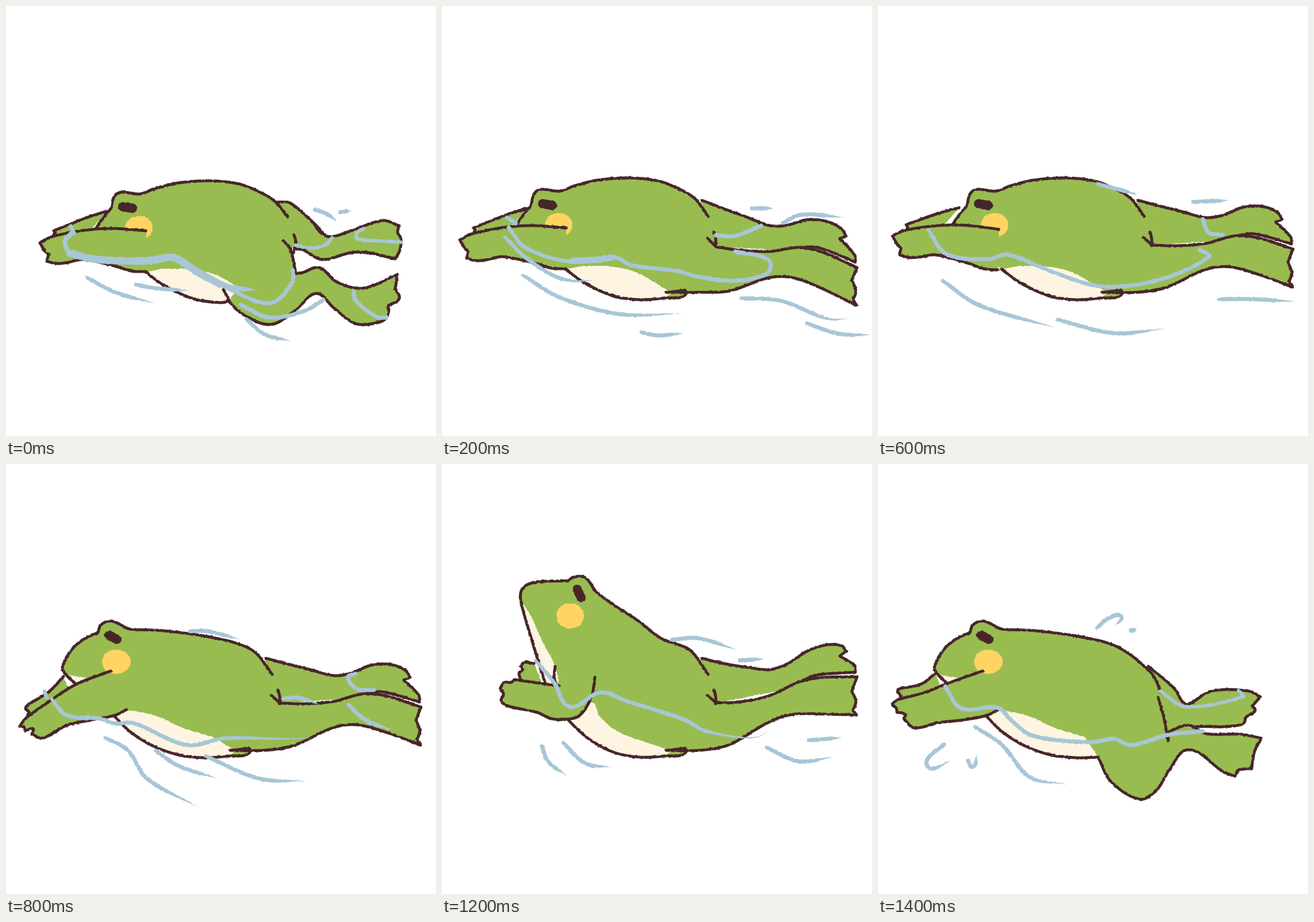
An HTML page for the animation above (1600 ms loop, 748 by 748 pixels).

```html
<!DOCTYPE html>
<html lang="en">
<head>
<meta charset="utf-8">
<title>Swimming frog</title>
<style>
html, body { margin: 0; width: 100%; height: 100%; overflow: hidden; background: #fff; }
svg { display: block; width: 100vw; height: 100vh; }
.pose {
  visibility: hidden;
  animation: show 1600ms step-end infinite;
  animation-delay: calc(var(--i) * 200ms - 1600ms);
}
@keyframes show {
  0% { visibility: visible; }
  12.5%, 100% { visibility: hidden; }
}
</style>
</head>
<body>
<svg id="stage" viewBox="0 0 748 748" xmlns="http://www.w3.org/2000/svg">
  <filter id="rough" filterUnits="userSpaceOnUse" x="0" y="0" width="748" height="748" color-interpolation-filters="sRGB">
    <feTurbulence type="fractalNoise" baseFrequency=".2" numOctaves="2" seed="4"/>
    <feDisplacementMap in="SourceGraphic" scale="3" xChannelSelector="R" yChannelSelector="G"/>
  </filter>
</svg>
<script>
const GREEN = '#99bc50', INK = '#47262a', CREAM = '#fef4e2', GOLD = '#ffd462', BLUE = '#a8c6d7';
const stage = document.getElementById('stage');

// Outlines are strings of "x,y" points; a slash makes the point before it a corner.
const readPoints = text => text.trim().split(/\s+/).map(pair => pair.split(',').map(Number));
const warp = (text, rule) => text.replace(/([\d.]+),([\d.]+)/g, (_, x, y) => rule(+x, +y).map(v => +v.toFixed(1)));

const move = (text, dx, dy) => warp(text, (x, y) => [x + dx, y + dy]);
// Arms turn about the chin.
const tilt = (text, slope) => warp(text, (x, y) => [x, y + (x - 150) * slope]);
// Arms sink towards the hand.
const droop = (text, drop) => warp(text, (x, y) => [x, y + drop * (Math.max(0, 150 - x) / 126) ** 2]);
// Legs swing straight, or curl more towards the feet.
const bend = (text, swing, curl) => warp(text, (x, y) => {
  const u = Math.max(0, x - 452) / 270;
  return [x, y + swing * u + curl * u * u];
});
function mix(from, to, t) {
  const ends = to.match(/[\d.]+,[\d.]+/g).map(pair => pair.split(',').map(Number));
  let i = 0;
  return warp(from, (x, y) => {
    const [ex, ey] = ends[i++];
    return [x + (ex - x) * t, y + (ey - y) * t];
  });
}

const low = {
  backArm: '147,352 110,364 55,386 / 58,391 / 50,402 120,385',
  arm: '216,386 160,382 128,383 90,388 50,397 31,407 / 40,422 46,427 / 43,439 / 60,443 80,441 105,436 160,447 190,456 215,457',
  head: '128,383 / 140,365 155,347 / 160,327 172,319 205,322 230,313 270,303 325,299 375,304 410,317 440,335',
  cheek: '203,381 24,21', eye: '175,344 192,347',
  belly: '345,511 300,505 250,483 215,458',
  top: '250,452 300,454 340,464 375,484'
};
const mid = {
  backArm: '100,364 75,383 40,390 / 34,394 40,404 / 38,410 110,390',
  arm: '182,360 120,382 80,398 35,410 24,418 / 32,425 33,432 / 47,435 45,443 / 63,459 105,450 150,445 190,437 210,427',
  head: '121,383 / 100,361 99,350 115,322 135,305 160,293 / 165,280 182,273 200,280 215,287 260,289 310,294 360,302 405,313 435,329',
  chest: '100,361 107,366 120,369 130,371 140,373 121,383 110,372',
  cheek: '192,344 25,21', eye: '179,298 193,305',
  belly: '345,511 300,506 255,490 215,465 187,437',
  top: '212,429 260,438 310,460 360,475'
};
const high = {
  backArm: '160,347 143,345 137,352 / 140,358 134,364 138,377 / 175,384',
  arm: '204,386 160,380 126,375 / 120,380 108,380 101,391 / 107,400 103,412 115,421 165,432 190,443 218,444 240,437 260,405 266,371',
  head: '180,383 / 155,302 137,237 140,217 160,206 220,203 / 228,197 245,196 255,203 268,222 300,246 340,272 382,304 405,312 433,325',
  chest: '138,238 155,265 175,310 195,348 200,385 180,383 155,302',
  cheek: '223,264 24,22', eye: '235,218 242,232',
  belly: '345,510 300,502 255,478 218,444',
  top: '245,435 261,415 275,440 305,465 345,481'
};
// Halfway up, with the arms carried along.
const rising = {
  ...mid,
  backArm: move(mid.backArm, 38, -3), arm: move(mid.arm, 38, -3),
  belly: '345,511 300,506 255,490 225,468 205,440', top: '245,432 275,440 320,463 360,477'
};
for (const key of ['head', 'chest', 'cheek', 'eye']) rising[key] = mix(mid[key], high[key], .62);

function reach(slope, dx) {
  const shape = { ...low };
  for (const key of ['arm', 'backArm']) shape[key] = move(tilt(low[key], slope), dx, -1);
  return shape;
}
const dipped = { ...mid, arm: droop(mid.arm, 38), backArm: droop(mid.backArm, 36) };
const ahead = {};
for (const key in low) ahead[key] = key === 'cheek' ? '231,386 24,21' : move(low[key], 28, 5);

const straight = (swing = 0, curl = 0) => ({
  far: bend('452,338 490,348 530,358 570,368 600,364 635,350 670,349 695,359 703,371 / 692,376 / 718,402 719,414 / 690,405 650,396 615,402', swing, curl),
  join: bend('/ 600,408 / 478,416 / 440,390', swing, curl),
  near: bend('462,403 477,416 / 520,417 570,413 620,400 660,403 722,423 / 713,445 / 720,465 715,479 / 721,489 / 665,468 620,455 590,454 560,462 500,490 450,498 390,498', swing, curl),
  thigh: '425,500 385,508', back: '463,366', lines: ['k 473,393 476,404 476,417']
});
const kicking = {
  far: '473,341 495,343 540,382 560,401 600,391 655,373 683,382 / 681,394 / 687,405 685,425 677,440 / 630,429 600,429 550,441 518,425 504,422',
  join: '/ 470,420',
  near: '482,408 495,424 504,465 / 515,464 545,455 575,480 620,491 681,467 / 677,492 / 684,509 665,521 / 665,535 655,548 610,553 570,525 540,500 505,528 460,554 410,535 388,514',
  thigh: '388,514', back: '490,367',
  lines: ['k 378,493 390,516', 'k 501,398 504,410 500,430', 'k 536,380 546,393 560,401']
};
const tucked = {
  far: '470,352 515,390 530,414 540,418 580,395 645,395 665,405 / 651,421 / 656,429 640,440 / 635,452 600,457 555,457 505,467',
  join: '/ 480,440',
  near: '487,406 497,440 505,482 / 505,466 / 540,454 570,469 630,470 667,477 / 655,500 650,530 / 628,532 621,543 / 600,535 540,497 505,535 485,567 455,583 405,552 383,510',
  thigh: '383,510', back: '460,349 480,370 492,397', lines: []
};

// Water: w is an even line, t thins out at its end; a number sets the width.
const poses = [
  [ahead, kicking, [
    'w8 113,396 103,408 107,425 114,433', 'w13 112,430 150,440 200,443 250,443 292,438 330,461 372,484',
    't9 365,480 395,490 436,494', 'w 372,484 440,515 470,513 498,480 499,460', 'w 408,520 460,542 520,530 552,511',
    't 416,543 450,571 497,583', 't 138,471 190,498 258,517', 't 223,484 260,491 320,495',
    't 534,354 555,360 576,374', 't 578,359 600,356',
    'w6 503,416 530,421 555,416 567,403', 'w6 622,387 610,395 612,405 640,408 687,411',
    'w 605,496 608,512 645,541 662,542', 'w 113,384 118,395'
  ]],
  [low, straight(32), [
    'w 116,385 145,420 225,445 300,437 330,451 410,461 440,470 500,478 545,473 570,460 566,440 510,427',
    'w11 228,443 260,442 295,438', 't 108,400 140,433 190,467 225,478 265,477',
    't 139,467 205,507 310,536 418,535', 't 344,567 375,573 420,569', 't 518,508 590,513 670,544 707,544',
    't 632,551 690,570 747,572', 't 536,352 577,352', 't 590,379 625,363 700,368',
    'w 476,399 510,400 555,382', 'w 113,368 128,378'
  ]],
  [reach(.15, -1), straight(), [
    'w 127,444 190,437 215,425 265,440 300,447 345,470 385,494 450,490 540,455 545,446 508,427 545,407 549,393 485,353',
    'w11 265,440 290,438 330,458 365,480 395,494', 't5 270,443 238,451',
    't 60,465 140,517 190,533 291,542', 't 273,558 400,567 450,571 530,541 600,550 624,546',
    't 570,497 640,499 646,491', 't 504,331 580,331 622,329', 't 433,313 475,316'
  ]],
  [reach(.05, -6), straight(), [
    'w 88,390 120,432 195,440 225,432 305,463 390,488 490,476 576,436 560,424',
    't 110,476 175,520 310,560', 't 310,545 410,569 500,561', 't 590,510 650,510 726,514',
    't 380,309 452,328', 't 545,341 610,338', 'w 565,371 575,394 600,398'
  ]],
  [dipped, straight(), [
    'w 67,396 71,406', 't 78,407 105,437 165,443 190,452 220,450 315,489 380,477 470,478 540,477',
    't 170,475 212,498 245,547 335,597', 't 258,497 300,525 368,547', 't 345,507 440,547 523,552',
    't 317,291 350,291 407,305', 't 480,408 510,407 545,418',
    'w 608,365 595,371 610,391 640,393', 't 594,417 625,445 672,463'
  ]],
  [rising, straight(), [
    't 112,378 150,423 255,431 345,464 440,468 500,479 555,470', 't 150,482 192,528 272,566',
    't 225,492 332,535', 't 385,518 525,533', 't 352,289 455,318', 't 570,478 650,493'
  ]],
  [high, straight(0, -53), [
    't 161,340 195,380 222,423 275,397 320,412 420,444 460,465 545,476 572,460',
    't 173,488 185,518 217,542', 't 209,483 250,521 296,527', 't 397,306 445,303 512,323',
    't 515,342 560,339', 't 562,492 620,517 679,510', 't 635,481 695,476'
  ], ['k 197,352 195,370 199,385']],
  [mid, tucked, [
    'w 117,387 145,425 208,424 235,449 270,473 370,484 410,478 440,489 505,471 565,465',
    'w6 491,395 535,422 635,405 627,394', 't 167,456 215,488 265,545 330,557',
    't 117,486 85,515 92,530 126,516', 't 155,513 165,527 172,507', 't 379,287 400,269 423,265 410,283', 't8 437,290 450,288'
  ]]
];

function add(parent, name, attrs) {
  const node = document.createElementNS('http://www.w3.org/2000/svg', name);
  for (const key in attrs) node.setAttribute(key, attrs[key]);
  if (parent) parent.append(node);
  return node;
}

// Smooth path through the points, with handles a third of each span.
function curve(text) {
  let d = '', last;
  for (const piece of text.split('/')) {
    const p = readPoints(piece);
    if (last) p.unshift(last); else d = 'M' + p[0];
    for (let i = 0; i < p.length - 1; i++) {
      const a = p[i], b = p[i + 1], span = Math.hypot(b[0] - a[0], b[1] - a[1]) / 3;
      const handle = (at, from, to, sign) => {
        const dx = to[0] - from[0], dy = to[1] - from[1], k = sign * span / (Math.hypot(dx, dy) || 1);
        return [at[0] + dx * k, at[1] + dy * k];
      };
      d += `C${handle(a, p[i - 1] || a, b, 1)} ${handle(b, a, p[i + 2] || b, -1)} ${b}`;
    }
    last = p[p.length - 1];
  }
  return d;
}

// Outline of a brush stroke that thins out towards its end.
function brush(d, width) {
  const path = add(null, 'path', { d }), length = path.getTotalLength(), n = 40;
  const left = [], right = [];
  for (let i = 0; i <= n; i++) {
    const u = i / n, at = path.getPointAtLength(u * length);
    const p = path.getPointAtLength(Math.max(0, u * length - 1));
    const q = path.getPointAtLength(Math.min(length, u * length + 1));
    const k = width / 2 * Math.min(1, (1 - u) * 3.2, .75 + u * 4) / (Math.hypot(q.x - p.x, q.y - p.y) || 1);
    const nx = (p.y - q.y) * k, ny = (q.x - p.x) * k;
    left.push([at.x + nx, at.y + ny]);
    right.unshift([at.x - nx, at.y - ny]);
  }
  return 'M' + left.concat(right).join('L') + 'Z';
}

poses.forEach(([body, legs, water, extra = []], i) => {
  const group = add(stage, 'g', {
    class: 'pose', style: `--i:${i}`, filter: 'url(#rough)',
    'stroke-linecap': 'round', 'stroke-linejoin': 'round'
  });
  const fill = (text, color) => add(group, 'path', { d: curve(text), fill: color });
  const line = (text, color, width) => add(group, 'path', { d: curve(text), fill: 'none', stroke: color, 'stroke-width': width });
  const limb = (text, join = '') => { fill(text + join, GREEN); line(text, INK, 5); };

  const under = `${legs.near} / ${legs.thigh} ${body.belly}`;
  const over = `${body.head} ${legs.back}`;
  limb(body.backArm);
  limb(legs.far, legs.join);
  fill(`${under} / ${over}`, GREEN);
  fill(`${legs.thigh.replace('425,500', '400,499')} ${body.belly} / ${body.top}`, CREAM);
  if (body.chest) fill(body.chest, CREAM);
  line(under, INK, 5);
  line(over, INK, 5);

  const [[cx, cy], [rx, ry]] = readPoints(body.cheek);
  add(group, 'ellipse', { cx, cy, rx, ry, fill: GOLD });
  limb(body.arm);
  line(body.eye, INK, 16);

  for (const item of [...legs.lines, ...extra, ...water]) {
    const [, kind, size, text] = item.match(/^(\w)(\d*) (.*)$/);
    if (kind === 't') add(group, 'path', { d: brush(curve(text), size || 7), fill: BLUE });
    else line(text, kind === 'k' ? INK : BLUE, size || (kind === 'k' ? 5 : 7));
  }
});
</script>
</body>
</html>
```
